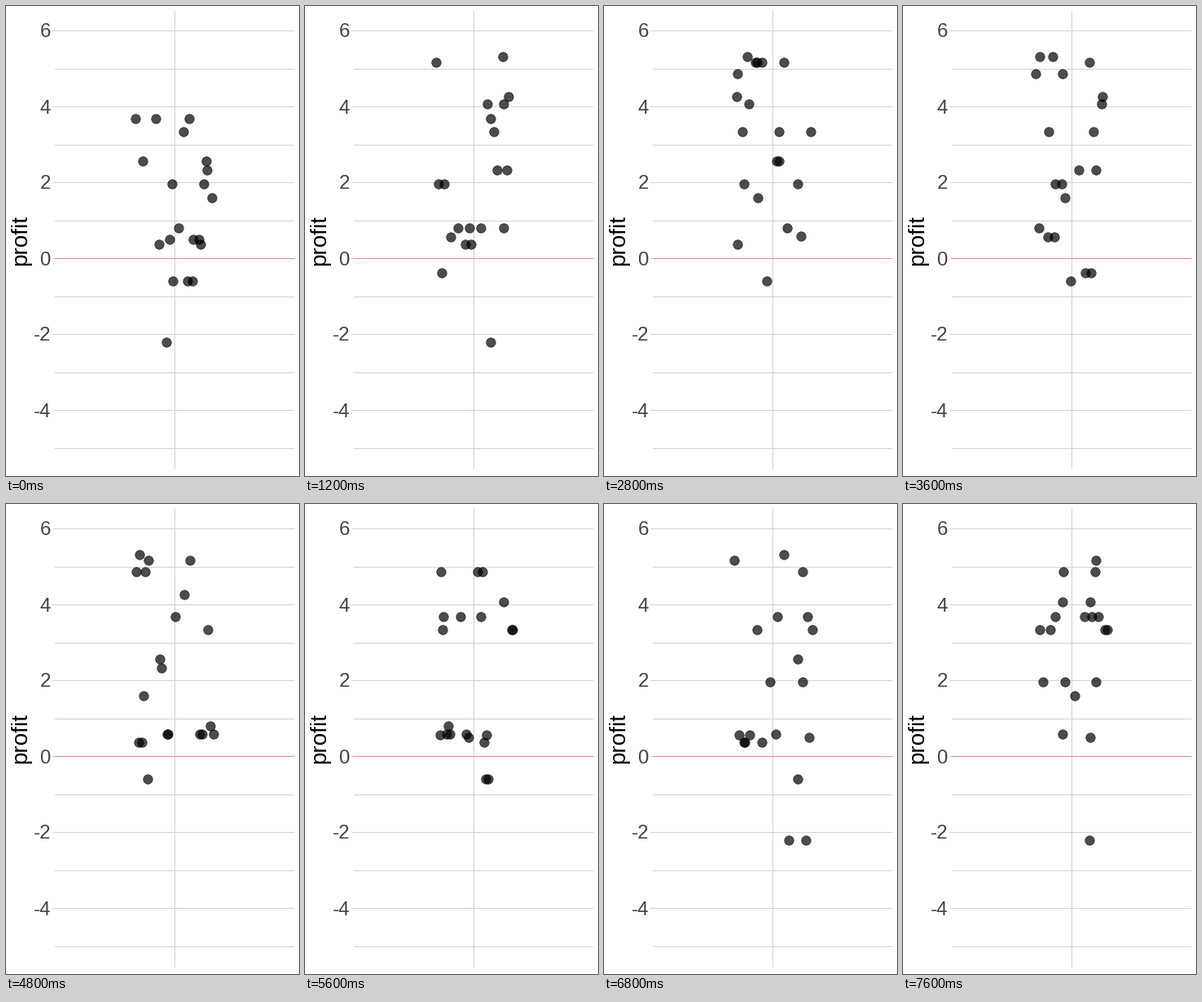
Write a matplotlib script that moves like this. It is 360 px wide and 576 px high and loops after 8000 ms.

```python
import random

import matplotlib.pyplot as plt
from matplotlib.animation import FuncAnimation

W, H, DPI = 360, 576, 72
LEFT, RIGHT, TOP, BOTTOM = 60, 354.4, 5.5, 567.8
ZERO, UNIT = 309.7, 46.47
MIDDLE = 207
JITTER = 49
STEPS, STEP_MS = 20, 400

PROFITS = [5.32, 5.19, 4.87, 4.27, 4.09, 3.69, 3.345, 3.345, 2.58, 2.33,
           1.965, 1.61, 0.82, 0.605, 0.565, 0.505, 0.375, -0.37, -0.59, -2.2]

GRID, RED = "#d2d2d2", "#f8848c"

plt.rcParams["font.family"] = "Liberation Sans"


def to_y(profit):
    return ZERO - UNIT * profit


def resample(step):
    """Bootstrap sample of the profits, spread sideways at random."""
    rng = random.Random(step)
    return [(MIDDLE + rng.uniform(-JITTER, JITTER), to_y(p))
            for p in rng.choices(PROFITS, k=len(PROFITS))]


fig = plt.figure(figsize=(W / DPI, H / DPI), dpi=DPI, facecolor="white")
ax = fig.add_axes([0, 0, 1, 1])
ax.set(xlim=(0, W), ylim=(H, 0))
ax.axis("off")


def rule(xs, ys, color):
    ax.plot(xs, ys, color=color, lw=1, solid_capstyle="butt", snap=False,
            zorder=1)


def pixel_row(profit):
    return int(to_y(profit)) + 0.5


rule([MIDDLE + 0.5] * 2, [TOP, BOTTOM], GRID)
for value in range(-5, 7):
    y = pixel_row(value)
    major = value % 2 == 0
    rule([LEFT - 3 if major else LEFT, RIGHT], [y, y], GRID)
    if major:
        ax.text(55, y + 8, str(value), size=24, color="#444444",
                ha="right", va="baseline")
rule([LEFT, RIGHT], [pixel_row(0)] * 2, RED)
ax.text(25, 286.5, "profit", size=28, color="black", rotation=90,
        rotation_mode="anchor", ha="center", va="baseline")

dots = ax.scatter([], [], s=11.5 ** 2, c="black", edgecolors="black",
                  linewidths=0.7, alpha=0.7, zorder=3, snap=False)


def update(step):
    dots.set_offsets(resample(step))
    return dots,


anim = FuncAnimation(fig, update, frames=STEPS, interval=STEP_MS,
                     repeat=True, repeat_delay=0, blit=False)
plt.show()
```
